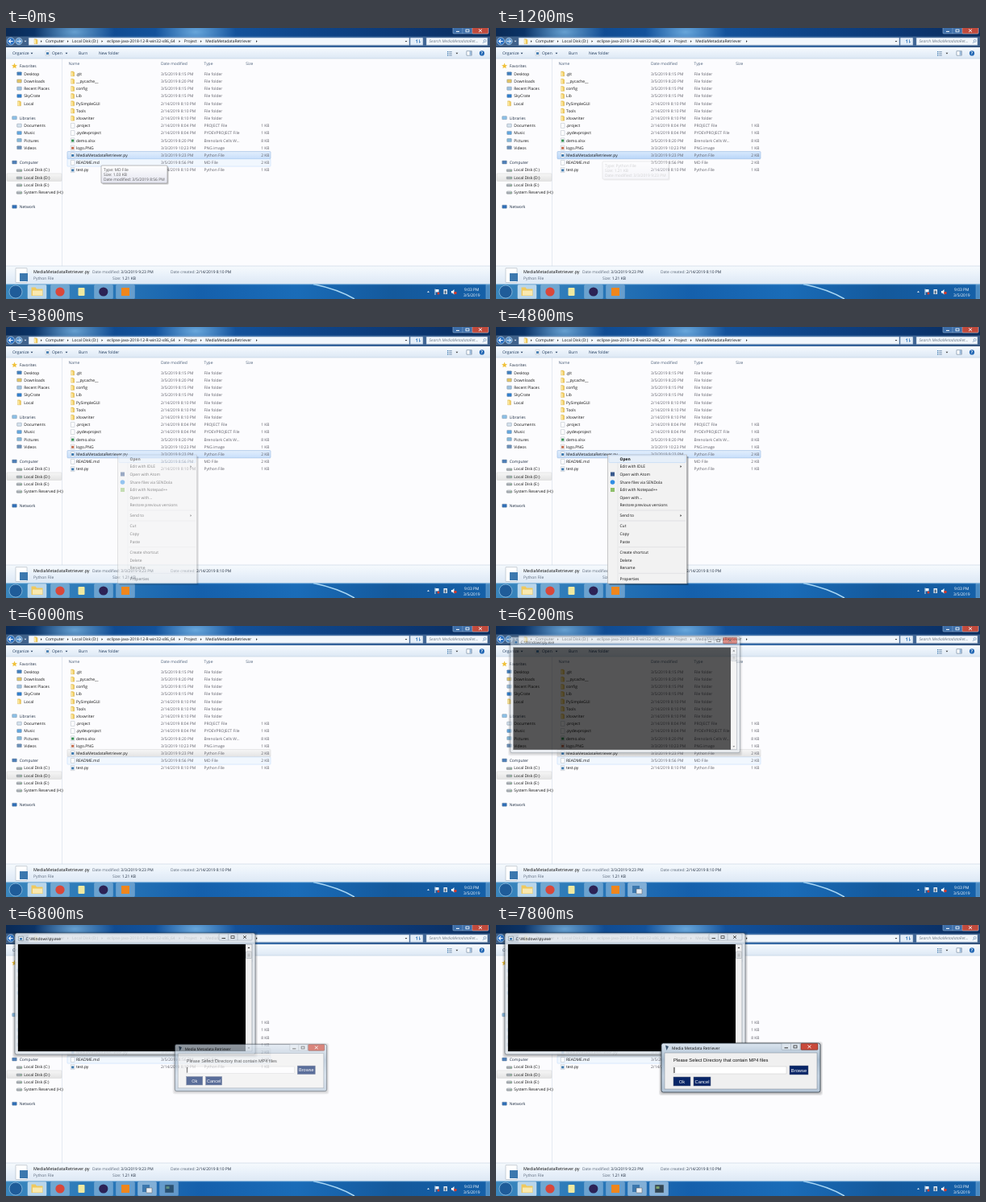
These frames come from a looping animation (600 by 337 pixels, 8000 ms). An HTML page:

```html
<!DOCTYPE html>
<html lang="en">
<head>
<meta charset="utf-8">
<title>File browser</title>
<style>
html, body { margin: 0; width: 100%; height: 100%; overflow: hidden; background: #fff }
svg { display: block; width: 100vw; height: 100vh }
svg svg { width: 69px; height: 300px }
text { font: 4.95px "Open Sans", "Noto Sans", sans-serif; text-rendering: geometricPrecision; white-space: pre }
.tk text { font-family: "Liberation Sans", Arial, sans-serif }
</style>
</head>
<body>
<svg id="stage" viewBox="0 0 600 337" preserveAspectRatio="none"></svg>
<script>
const LOOP = 8000, STEP = 200;

// Markup helpers
const text = (x, y, s, fill = '#111', style = '', anchor = 'start') =>
  `<text x="${x}" y="${y}" fill="${fill}" style="${style}" text-anchor="${anchor}">${s}</text>`;
const rect = (x, y, w, h, fill, more = '') =>
  `<rect x="${x}" y="${y}" width="${w}" height="${h}" fill="${fill}" ${more}/>`;
const dot = (x, y, r, fill, more = '') => `<circle cx="${x}" cy="${y}" r="${r}" fill="${fill}" ${more}/>`;
const path = (d, fill, more = '') => `<path d="${d}" fill="${fill}" ${more}/>`;
const line = (d, color, w = .6) => path(d, 'none', `stroke="${color}" stroke-width="${w}"`);
const right = (x, y, fill = '#333') => path(`M${x} ${y - 1.4}l1.6 1.4l-1.6 1.4z`, fill);
const down = (x, y, fill = '#333') => path(`M${x - 1.4} ${y - .7}h2.8l-1.4 1.6z`, fill);
const up = (x, y, fill = '#333') => path(`M${x - 1.4} ${y + .7}h2.8l-1.4 -1.6z`, fill);
const edge = (color, r = .8, w = .5) => `stroke="${color}" stroke-width="${w}" rx="${r}"`;
const group = (id, body, more = '') => `<g id="${id}" ${more}>${body}</g>`;
const grad = (id, colors, across) =>
  `<linearGradient id="${id}" x2="${across ? 1 : 0}" y2="${across ? 0 : 1}">` +
  colors.map((c, i) => `<stop offset="${i / (colors.length - 1)}" stop-color="${c}"/>`).join('') +
  '</linearGradient>';

// Icons, centred on x, y
const folder = (x, y) => path(`M${x - 2} ${y - 3}h2.4l1.6 1v5h-4z`, '#f0cb5c', 'stroke="#c79d35" stroke-width=".3"') +
  path(`M${x - 2} ${y - 2.6}l2 .9v4.9l-2 -1z`, '#fbe9a6');
const sheet = (x, y, mark) => rect(x - 2.3, y - 3, 4.6, 6, '#fff', edge('#9aa5b1', .2, .4)) +
  (mark ? rect(x - 1.5, y - 1.2, 3, 3, mark) : '');
const drive = (x, y) => rect(x - 3.3, y - .8, 6.6, 2.8, '#a9afb5', edge('#666c73', .6, .4)) +
  rect(x - 2.4, y - 1.8, 4.8, 1.1, '#d6dade') + rect(x + 1.4, y + .3, 1, .8, '#5fd35f');
const panel = (x, y, color) => rect(x - 2.8, y - 2.2, 5.6, 4, color, edge('#6d8096', .4, .4));

const rowY = i => 57 + 9.2 * i;
const GREY = '#60606a', BLUE = '#3c78ae';

const topBar = () => {
  const crumbs = [[49, 'Computer'], [82, 'Local Disk (D:)'], [125.3, 'eclipse-java-2018-12-R-win32-x86_64'],
    [220.8, 'Project'], [247.3, 'MediaMetadataRetriever']];
  const glow = x => `<ellipse cx="${x}" cy="5" rx="50" ry="22" fill="url(#glow)"/>`;
  return rect(0, 0, 600, 24, 'url(#sky)') + glow(85) + glow(235) +
    rect(0, 10.5, 600, 13, '#b9d3ec', 'opacity=".3"') +
    dot(6, 16.5, 4.6, '#2a6fc0', 'stroke="#cfe2f4" stroke-width=".6"') + line('M8.6 16.5H3.8M6 14.2L3.6 16.5L6 18.8', '#fff', 1.1) +
    dot(16, 16.5, 4.2, '#5b93cb', 'stroke="#cfe2f4" stroke-width=".6"') + line('M13.6 16.5H18.4M16.2 14.4L18.5 16.5L16.2 18.6', '#dbe9f6', 1) +
    down(24, 16.5, '#dfeaf5') +
    rect(28, 12, 472, 9.4, '#f2f7fc', edge('#5d7da4', .4)) + folder(37, 16.7) +
    [43, 76, 118.5, 214.5, 241, 310].map(x => right(x, 16.6)).join('') +
    crumbs.map(([x, s]) => text(x, 18.4, s)).join('') +
    down(496, 16.6) + rect(501, 12, 16, 9.4, '#e4eef8', edge('#5d7da4', .4)) +
    line('M509.5 18.6v-4l-1.4 1.5M512.5 14.4v4l1.4 -1.5', '#2d74ba', .8) +
    rect(521, 12, 76, 9.4, '#f2f7fc', edge('#5d7da4', .4)) +
    text(524.5, 18.4, 'Search MediaMetadataRet...', '#6b7886', 'font-style:italic') +
    dot(593.6, 16, 1.5, 'none', 'stroke="#5a7fa8" stroke-width=".6"') + line('M592.5 17.2l-1.5 1.7', '#5a7fa8', .7) +
    rect(554, -1, 44, 8, '#3d6ea8', edge('#a8c3de', 1)) + rect(578, -1, 20, 8, '#c04a3c', edge('#e3b5ae', 1)) +
    line('M566 -1V7', '#a8c3de', .4) + line('M558 4.4h4', '#fff', 1) +
    rect(570, 2, 4, 2.8, 'none', edge('#fff', 0, .8)) + line('M586 1.5l4 3.6m0 -3.6l-4 3.6', '#fff', .9);
};

const toolbar = () => rect(0, 24, 600, 14, 'url(#bar)') + line('M0 38H600', '#b3c4d8', .5) +
  text(8, 33, 'Organize', '#1e395b') + down(32, 31.5, '#1e395b') +
  sheet(51.5, 31.3, '#4b82b5') + text(57, 33, 'Open', '#1e395b') + down(75, 31.5, '#1e395b') +
  text(90, 33, 'Burn', '#1e395b') + text(115, 33, 'New folder', '#1e395b') +
  [29, 31.2, 33.4].map(y => rect(547, y, 1.4, 1.2, BLUE) + rect(549.2, y, 3.6, 1.2, '#8ba3bd')).join('') +
  down(559, 31.5) + rect(571, 28.6, 6.4, 5.6, '#fff', edge('#44617f', .2)) + rect(574.6, 29, 2.5, 4.8, '#9bb9d8') +
  dot(590, 31.4, 3.1, '#2267b4') + text(590, 33.2, '?', '#fff', 'font-weight:bold', 'middle');

const sidebar = () => {
  const heads = [[47.5, 'Favorites'], [111.8, 'Libraries'], [167.3, 'Computer'], [222.5, 'Network']];
  const lists = [
    [57, 'Desktop', 'Downloads', 'Recent Places', 'SkyCrate', 'Local'],
    [121.4, 'Documents', 'Music', 'Pictures', 'Videos'],
    [176.6, 'Local Disk (C:)', 'Local Disk (D:)', 'Local Disk (E:)', 'System Reserved (H:)']];
  const tints = ['#3f7fc0', '#e5c565', '#9fc2e0', '#2f7fd0', '#f0cb5c', '#d5e2ee', '#63a7df', '#86b9d9', '#6c90ba'];
  return line('M69.5 38V296', '#dbe3ec', .7) +
    rect(1, 181, 68, 9.4, 'url(#dim)', edge('#d0d0d0')) +
    path('M10.5 43.6l1 2.4 2.5 .2 -1.9 1.6 .6 2.5 -2.2 -1.4 -2.2 1.4 .6 -2.5 -1.9 -1.6 2.5 -.2z', '#f0c13a') +
    panel(10.5, 111.9, '#8cc1e8') + panel(10.5, 167.2, '#4f7fb8') + panel(10.5, 222.4, '#2f6fb8') +
    '<svg>' +
    heads.map(([y, s]) => text(16.7, y + 1.8, s, '#1b2b40')).join('') +
    lists.map(([y0, ...items], g) => items.map((s, i) => {
      const y = y0 + 9.2 * i;
      return (g > 1 ? drive(16.5, y) : s === 'Local' ? folder(16.5, y) : panel(16.5, y, tints[g * 5 + i])) + text(22.3, y + 1.8, s);
    }).join('')).join('') + '</svg>';
};

const fileList = () => {
  const dir = 'File folder', feb = '2/14/2019 8:10 PM', mar = '3/5/2019 8:15 PM';
  const files = [
    ['.git', mar, dir], ['__pycache__', '3/5/2019 8:20 PM', dir], ['config', mar, dir], ['Lib', mar, dir],
    ['PySimpleGUI', feb, dir], ['Tools', feb, dir], ['xlsxwriter', feb, dir],
    ['.project', '2/14/2019 8:04 PM', 'PROJECT File', 1], ['.pydevproject', '2/14/2019 8:04 PM', 'PYDEVPROJECT File', 1],
    ['demo.xlsx', '3/5/2019 8:20 PM', 'Brenolark Cells W...', 8, '#2f8f4e'], ['logo.PNG', '3/3/2019 10:23 PM', 'PNG image', 1, '#c46a4a'],
    ['MediaMetadataRetriever.py', '3/3/2019 9:23 PM', 'Python File', 2, BLUE],
    ['README.md', '3/5/2019 8:56 PM', 'MD File', 2], ['test.py', feb, 'Python File', 1, BLUE]];
  const heads = [[77.5, 'Name'], [192, 'Date modified'], [245.5, 'Type'], [297.3, 'Size']];
  return heads.map(([x, s]) => text(x, 45.8, s, '#4c607a')).join('') +
    rect(76, 153.6, 252, 9.2, 'url(#picked)', 'id="selection" ' + edge('#84acdd')) +
    rect(76, 162.9, 252, 9.2, '#f1f7fe', 'id="hover" ' + edge('#b8d6fb')) +
    files.map(([name, date, type, size, mark], i) => {
      const y = rowY(i), b = y + 1.8;
      return (size ? sheet(82.7, y, mark) : folder(82.7, y)) + text(87, b, name) +
        text(192, b, date, GREY) + text(245.5, b, type, GREY) +
        (size ? text(326.5, b, size + ' KB', GREY, '', 'end') : '');
    }).join('');
};

const details = () => {
  const label = (x, y, a, b) => text(x, y, `${a} <tspan fill="#1e2b3d">${b}</tspan>`, '#5a6779');
  return rect(0, 296, 600, 22.5, 'url(#bar)') + line('M0 296H600', '#c3d1e0', .6) +
    rect(12, 298.5, 14, 18, '#fff', edge('#9aa5b1', .4)) + rect(17, 305, 10, 10, BLUE) +
    text(34, 305, 'MediaMetadataRetriever.py', '#111', 'font-size:5.4px') + text(34, 313, 'Python File', '#5a6779') +
    label(107, 305, 'Date modified:', '3/3/2019 9:23 PM') + label(204, 305, 'Date created:', '2/14/2019 8:10 PM') +
    label(132, 313, 'Size:', '1.21 KB');
};

const slot = (x, a) => rect(x, 319.6, 23, 17, '#e4f2fc', `opacity="${a}" ` + edge('#fff', 1));
const taskbar = () => rect(0, 318.5, 600, 18.5, 'url(#task)') +
  line('M381 318.5Q412 325 432 337', '#a9d8f6', 1.6) +
  line('M0 318.8H600', '#8fc0e6', .6) +
  dot(12, 328, 8, '#1f5c99', 'stroke="#9fcbea" stroke-width=".7"') +
  slot(27, .75) + path('M31.5 322.5h5l1.5 2h7.5v8.5h-14z', '#efc95e') + rect(33, 326.5, 12, 6, '#f9e9b0') +
  slot(55.5, .35) + dot(67, 328, 5.6, '#d9473a') + rect(89.5, 323, 8, 10, '#f0e9a0', 'rx="1"') +
  slot(109.5, .35) + dot(120.8, 328, 5.6, '#2c2255') +
  slot(136.5, .35) + rect(143, 323, 10, 10, '#ef861c') +
  group('taskPy', slot(163.5, .5) + rect(169, 323, 9, 9, BLUE) + rect(174, 327, 7, 6, '#e9eef3', edge('#555', .3))) +
  group('taskTk', slot(190.5, .55) + rect(197, 323, 11, 10, '#324654', edge('#8aa2b2', .5)) + rect(198.5, 325, 4, 3, '#7ca36a')) +
  up(523.5, 328, '#fff') + line('M532 324.5V332', '#fff', .8) + rect(532.5, 325, 4, 3.4, '#fff') + dot(536, 330, 1.5, '#d33a2e') +
  rect(542.5, 325, 4.5, 6, '#e6eef6') + rect(543.6, 326.5, 2.3, 4, '#5d7690') +
  path('M552 327h1.5l2 -2v6.4l-2 -2H552z', '#fff') + dot(557, 329.5, 1.8, '#d33a2e') +
  text(577.3, 326.6, '9:03 PM', '#fff', '', 'middle') + text(577.3, 334.4, '3/5/2019', '#fff', '', 'middle') +
  rect(595, 319, 5, 18, '#7db4dd', 'opacity=".5" ' + edge('#cfe5f5', .3));

const tooltip = (id, x, y, lines) => group(id,
  rect(x + 1.5, y + 1.5, 82, 22, '#000', 'opacity=".22" rx="1"') +
  rect(x, y, 82, 22, 'url(#tip)', edge('#767676', 1)) +
  lines.map((s, i) => text(x + 3, y + 6.5 + i * 6.4, s, '#575757')).join(''));

const menu = () => {
  const items = [[164, 'Open'], [173.5, 'Edit with IDLE'], [183, 'Open with Atom'], [193, 'Share files via SENDola'],
    [202.5, 'Edit with Notepad++'], [212, 'Open with...'], [221.5, 'Restore previous versions'], [234.5, 'Send to'],
    [247.5, 'Cut'], [257.5, 'Copy'], [267, 'Paste'], [280.5, 'Create shortcut'], [290, 'Delete'], [299.5, 'Rename'], [313, 'Properties']];
  return group('menu', rect(140.5, 161, 98, 160, '#000', 'opacity=".3"') +
    rect(138.5, 159, 98, 160, '#f2f2f2', edge('#979797', 0)) + line('M151 160V318', '#dedfe1', .6) +
    [228, 241, 273.7, 306.3].map(y => line(`M152 ${y}H235`, '#d5d6d8')).join('') +
    rect(140, 159.8, 95, 8.8, '#e6eff9', edge('#aecff7')) +
    rect(142, 180.5, 5, 5, '#3a5a8c') + dot(144.5, 193, 2.8, '#2f8de4') + rect(142, 200, 5, 5, '#8fbf6a') +
    items.map(([y, s], i) => text(153.5, y + 1.8, s, '#111', i ? '' : 'font-weight:bold')).join('') +
    right(228.5, 173.5) + right(228.5, 234.5));
};

const caption = (x, y, close, ink) => rect(x, y, 41, 8, '#dfe7ef', 'opacity=".8" ' + edge('#7d8a99', 1)) +
  line(`M${x + 11.5} ${y}v8M${x + 23} ${y}v8`, '#7d8a99', .4) + close +
  line(`M${x + 3.5} ${y + 5.5}h4.5`, ink, 1) + rect(x + 15, y + 2.6, 4, 3, 'none', edge(ink, 0, .8));
const cross = (x, y, c) => line(`M${x - 2} ${y - 1.8}l4 3.6m0 -3.6l-4 3.6`, c, .9);
const shadow = (x, y, w, h) => [3, 2, 1].map(d =>
  rect(x - d, y - d + 1, w + 2 * d, h + 2 * d, '#000', 'opacity=".08" rx="3"')).join('');

const consoleWin = () => group('console', shadow(11, 10, 298, 151) +
  rect(11, 10, 298, 151, '#eaf0f6', 'opacity=".82" ' + edge('#3d4a58', 2.5, .6)) +
  rect(15, 24, 290, 133, '#f0f0f0', edge('#6f7b88', 0)) + rect(15, 24, 282, 133, '#000') +
  rect(297.5, 33, 7, 8.5, '#dcdfe2', edge('#9da3a9', .5)) + line('M299.5 36h3M299.5 37.5h3M299.5 39h3', '#777', .4) +
  up(301, 28.2) + down(301, 153) +
  rect(15.5, 14.2, 6, 5.4, '#dfe6ec', edge('#60707f', .5)) + rect(17, 16, 3, 2.6, BLUE) +
  text(24.5, 18.8, 'C:\\Windows\\py.exe') +
  caption(264, 11, rect(287, 11, 18, 8, '#d2584a', 'id="hot" ' + edge('#7a3a34', 1)) + cross(296, 15, '#444'), '#444'));

const dialog = () => {
  const button = (x, y, w, s) => rect(x, y, w, 11, '#082567', edge('#55617d', 0)) +
    text(x + w / 2, y + 7.5, s, '#fff', 'font-size:5.8px', 'middle');
  return group('dialog', shadow(205, 147, 197, 61) +
    rect(205, 147, 197, 61, 'url(#glass)', edge('#2f3a46', 2.5, .8)) +
    rect(209, 159, 189, 45, '#f0f0f0', edge('#7b8794', 0)) +
    path('M210 149.5l4 1.4 -2.5 5z', '#39536d') +
    text(218, 155, 'Media Metadata Retriever', '#111', 'font-family:Open Sans,sans-serif') +
    caption(354, 147.3, rect(378, 147.3, 21, 8, '#c9493a', edge('#5c211b', 1)) + cross(388.5, 151.3, '#fff'), '#333') +
    text(220, 170.3, 'Please Select Directory that contain MP4 files', '#111', 'font-size:5.8px') +
    rect(220, 176, 140, 9, '#fff', edge('#c8c8c8', 0)) + line('M221 177V184', '#000', .9) +
    button(364, 175, 23, 'Browse') + button(220, 189, 21, 'Ok') + button(245, 189, 21, 'Cancel'), 'class="tk"');
};

stage.innerHTML = '<defs>' +
  grad('sky', ['#0a2a55', '#0f4a90', '#1558a4', '#0f478c', '#0c3a78', '#0a2c5c'], true) +
  grad('task', ['#3a86bd', '#2a78b8', '#1560ac', '#1a6cb8', '#14599c', '#1560a8'], true) +
  grad('bar', ['#f6fafd', '#e9f1fa', '#dde8f4']) + grad('picked', ['#e2eefc', '#c8dffb']) + grad('pickedHot', ['#d8e9fc', '#b9d6f9']) +
  grad('dim', ['#f6f6f6', '#e3e3e3']) + grad('tip', ['#fff', '#e4e5f0']) +
  grad('glass', ['#dbe5ef', '#a9bccf', '#c3d2e1', '#b4c5d7']) +
  '<radialGradient id="glow"><stop stop-color="#8cc8f2" stop-opacity=".7"/><stop offset="1" stop-color="#8cc8f2" stop-opacity="0"/></radialGradient></defs>' +
  rect(0, 0, 600, 337, '#fcfcfe') + topBar() + toolbar() + sidebar() + fileList() + details() + taskbar() +
  tooltip('tipMd', 118, 171, ['Type: MD File', 'Size: 1.03 KB', 'Date modified: 3/5/2019 8:56 PM']) +
  tooltip('tipPy', 132, 166, ['Type: Python File', 'Size: 1.21 KB', 'Date modified: 3/3/2019 9:23 PM']) +
  menu() + consoleWin() + dialog();

const el = id => document.getElementById(id);
const clamp = v => Math.max(0, Math.min(1, v));
const fade = (id, a) => el(id).setAttribute('opacity', clamp(a));
const ramp = (t, from, to) => clamp((t - from) / (to - from));

// A window grows and fades in around its centre
function open(id, t, at, cx, cy) {
  const p = t < at ? 0 : Math.min(1, .66 + (t - at) / 400);
  const k = 1 - .13 * (1 - p);
  fade(id, p);
  el(id).setAttribute('transform', `translate(${cx} ${cy}) scale(${k}) translate(${-cx} ${-cy})`);
  return p;
}

function draw(now) {
  const t = Math.floor(now % LOOP / STEP) * STEP;
  const hot = t >= 400 && t < 3800, idle = t >= 5800;
  fade('tipMd', 1 - ramp(t, 0, 400));
  fade('tipPy', ramp(t, 1000, 1800) - ramp(t, 2800, 3200));
  fade('hover', t < 400 || idle ? 1 : 0);
  fade('menu', ramp(t, 3600, 4000) - ramp(t, 5400, 5800));
  el('selection').setAttribute('fill', `url(#${idle ? 'dim' : hot ? 'pickedHot' : 'picked'})`);
  el('selection').setAttribute('stroke', idle ? '#d0d0d0' : '#84acdd');
  open('console', t, 6200, 162, 85);
  fade('hot', t < 6800 ? 1 : 0);
  fade('taskPy', t >= 6200 ? 1 : 0);
  fade('taskTk', open('dialog', t, 6800, 303.5, 177));
  requestAnimationFrame(draw);
}
draw(0);
</script>
</body>
</html>
```
